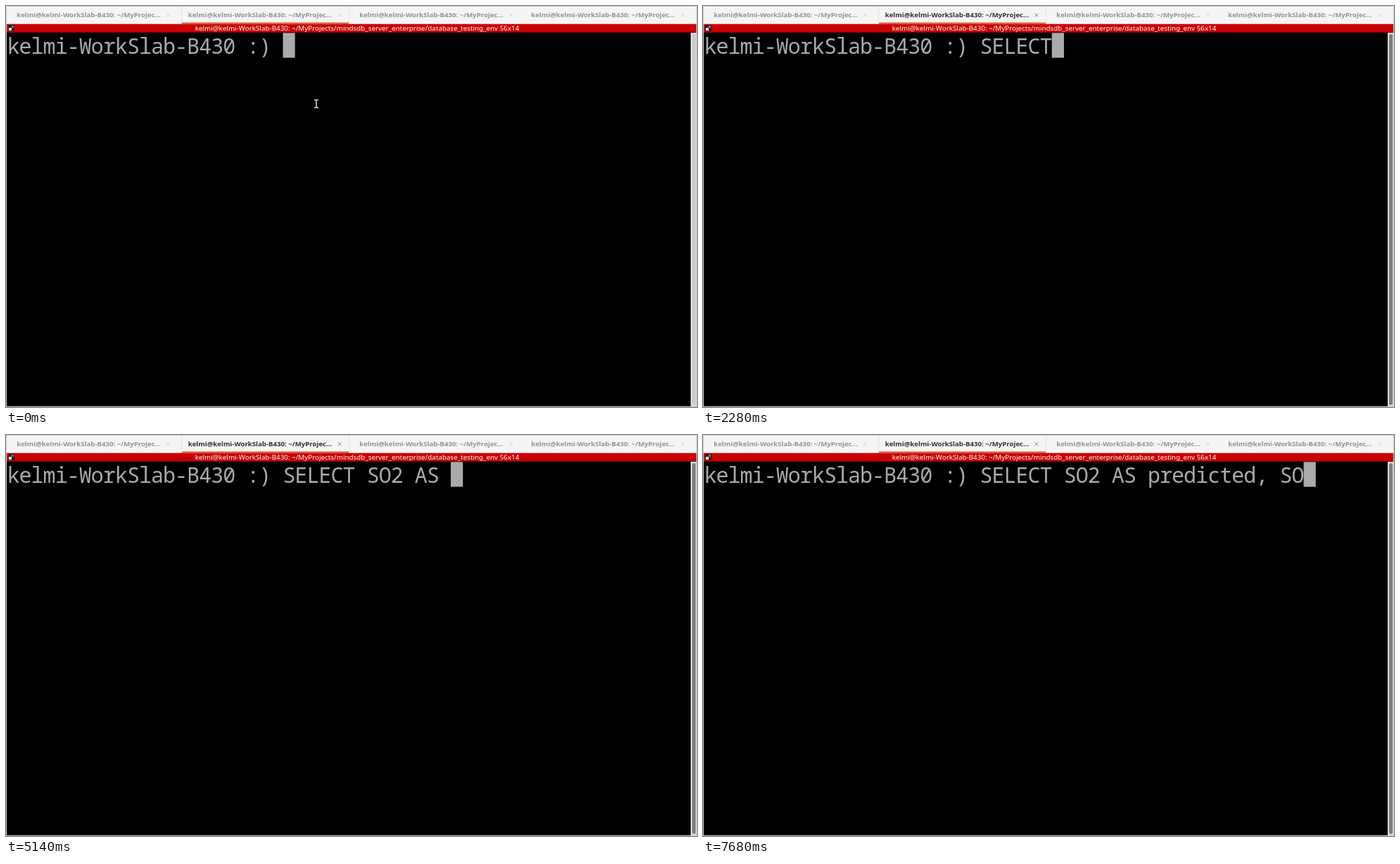
These frames come from a looping animation (982x570 px, 8000 ms). An HTML page:

```html
<!DOCTYPE html>
<html lang="en">
<head>
<meta charset="utf-8">
<title>Terminal</title>
<style>
  html, body { margin: 0; width: 100%; height: 100%; overflow: hidden; background: #f5f5f5; }
  svg { display: block; width: 982px; height: 570px; }
  text { white-space: pre; }
  .tab { font: bold 9.63px "Noto Sans", sans-serif; text-anchor: middle; fill: #929595; }
  .close { stroke: #d2d3d3; stroke-width: 1; fill: none; }
  .title { font: 9.84px "Noto Sans", sans-serif; text-anchor: middle; fill: #fff; }
  .shell { font: 30px "Noto Sans Mono", monospace; letter-spacing: calc(17.04px - .6em); fill: #aaa; }
</style>
</head>
<body>
<svg viewBox="0 0 982 570">
  <rect width="982" height="570" fill="#cdcdcb"/>
  <rect x="1" y="1" width="980" height="25" fill="#f5f5f5"/>
  <path d="M249.5 1V25M487.5 1V25" stroke="#e1e1df"/>
  <rect x="250" y="23.5" width="237" height="2" fill="#d9542b"/>
  <g id="tabs"></g>

  <rect x="1" y="38" width="972" height="531" fill="#000"/>
  <rect x="973" y="38" width="8" height="531" fill="#d8d8d6"/>
  <rect id="thumb" x="975" y="40" width="5" height="527" rx="2.5"/>

  <rect x="1" y="37" width="980" height="1" fill="#000"/>
  <rect x="1" y="25.6" width="980" height="12" fill="#c80000"/>
  <rect x="3" y="27" width="9" height="9" fill="#3b1618"/>
  <rect x="4" y="31" width="4" height="4" fill="#eee"/>
  <rect x="8" y="28" width="3" height="3" fill="#3b8fc4"/>
  <text class="title" id="title" x="499" y="35.2"></text>

  <text class="shell" id="line" x="1.5" y="68"></text>
  <rect id="caret" y="38.3" width="17.2" height="35.3" fill="#aaa"/>
  <path id="pointer" d="M438 133.5h2l1 1l1-1h2M441 134.5v9M438 144.5h2l1-1l1 1h2" fill="none" stroke="#ddd" stroke-width="1.5"/>
</svg>
<script>
  const LOOP = 8000, CELL = 17.04, LEFT = 1.6;
  const host = "kelmi-WorkSlab-B430";
  const prompt = host + " :) ";
  const query = "SELECT SO2 AS predicted, SO";
  const keyTimes = [
    1080, 1380, 1590, 1700, 1980, 2280, 2680,
    3090, 3260, 3750, 4190, 4580, 4770, 5140,
    5440, 5590, 5740, 5890, 6030, 6220, 6410, 6620, 6800,
    7130, 7310, 7500, 7680
  ];
  const focusTimes = [110, 230, 350, 470, 590];
  const pointerHides = 980;

  const $ = id => document.getElementById(id);
  const passed = (times, t) => times.filter(time => time <= t).length;
  const mixGray = (from, to, k) => {
    const v = Math.round(from + (to - from) * k);
    return `rgb(${v},${v},${v})`;
  };

  $("title").textContent =
    `kelmi@${host}: ~/MyProjects/mindsdb_server_enterprise/database_testing_env 56x14`;

  $("tabs").innerHTML = [117.5, 361, 604.5, 848.5].map(x => `
    <text class="tab" x="${x}" y="16.3">kelmi@${host}: ~/MyProjec…</text>
    <path class="close" d="M${x + 110.5} 10.5l5 5m0-5l-5 5"/>`).join("");
  const activeLabel = document.querySelectorAll(".tab")[1];
  const activeClose = document.querySelectorAll(".close")[1];

  function draw(now) {
    const t = now % LOOP;
    const focus = passed(focusTimes, t) / focusTimes.length;
    const typed = passed(keyTimes, t);

    activeLabel.style.fill = mixGray(147, 48, focus);
    activeClose.style.stroke = mixGray(210, 140, focus);
    $("thumb").setAttribute("fill", mixGray(203, 126, focus));

    $("line").textContent = prompt + query.slice(0, typed);
    $("caret").setAttribute("x", LEFT + (prompt.length + typed) * CELL);
    $("pointer").style.display = t < pointerHides ? "" : "none";
    requestAnimationFrame(draw);
  }
  draw(0);
</script>
</body>
</html>
```
